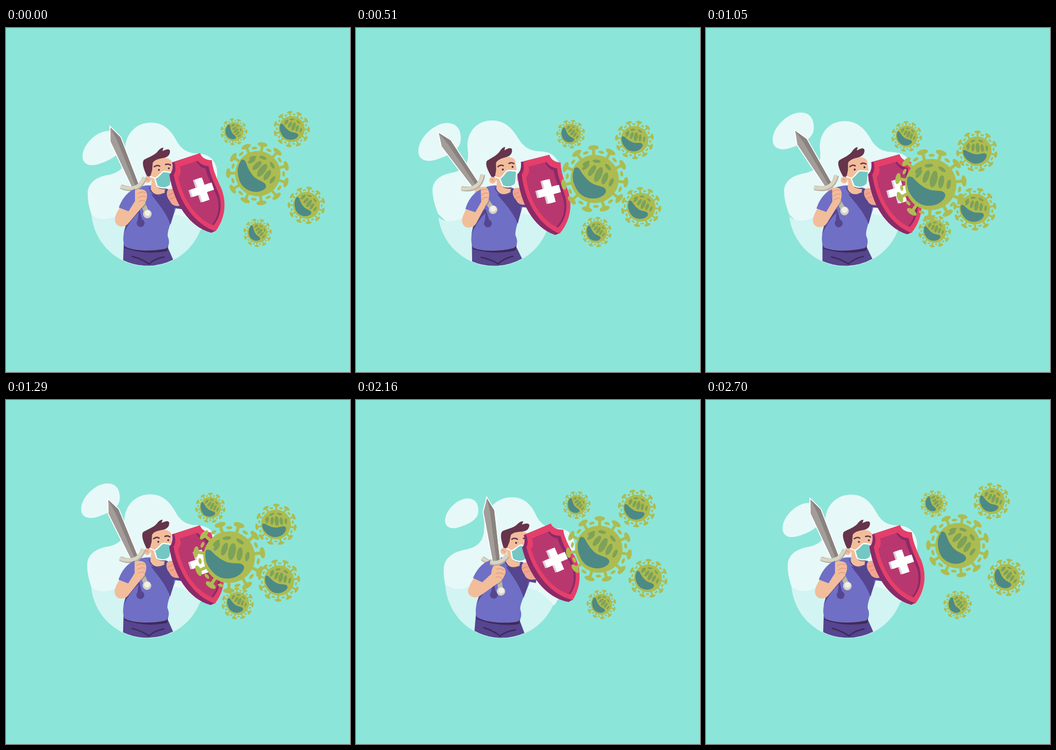
Recreate the animation shown at these times as an HTML page. Size 640x640 px, loop 2.73 s.

```html
<!DOCTYPE html>
<html lang="en">
<head>
<meta charset="utf-8">
<title>Shield against viruses</title>
<style>
html, body { margin: 0; width: 100%; height: 100%; overflow: hidden; background: #8ce5d9; }
svg { display: block; width: 100vw; height: 100vh; }
.skin { fill: #f2bd9b; }
.shirt { fill: #6f6fc6; }
.dark { fill: #56458f; }
.line { fill: none; stroke-linecap: round; stroke-linejoin: round; }
</style>
</head>
<body>
<svg viewBox="0 0 640 640">
  <defs>
    <g id="virus"></g>
    <path id="blade" d="M0-175L10-151L6.5-54H-6.5L-10-151Z"/>
    <path id="cross" d="M-7-22H7V-7H21V7H7V22H-7V7H-21V-7H-7Z"/>
  </defs>

  <path id="puff" fill="#e6f9f8" d="M-40 17C-40-8-10-36 14-36C34-36 40-22 40-6C40 16 14 26-6 33C-24 39-40 34-40 17Z"/>
  <path id="cloud" fill="#e6f9f8" d="M160 350C155 335 152 322 152 310C151 290 166 277 192 273C214 268 223 257 222 232C219 203 238 176 270 176C296 176 309 194 318 211C330 232 345 233 362 234C384 236 393 254 393 272C392 310 378 350 363 376L300 395L190 380Z"/>

  <g id="body">
    <path fill="#d2f4f3" d="M159 347C170 358 190 358 206 349C240 330 280 355 312 348C330 346 348 362 362 375A105 105 0 0 1 159 347Z"/>
    <path class="dark" d="M219 400L218 432A105 105 0 0 0 311 431L300 406Z"/>
    <path class="line" stroke="#3f2a55" stroke-width="2.5" d="M235 425Q254 430 266 439Q277 429 294 426"/>
    <path fill="#3f2a55" d="M222 399L220 409Q260 423 300 415L302 404Z"/>
    <path class="skin" d="M213 332C206 343 200 354 204 362C208 371 221 371 227 362L232 338Z"/>
    <path class="shirt" d="M236 300C250 294 262 292 270 293L296 298C308 301 316 312 318 328L314 342C308 358 299 380 301 388C306 399 302 410 295 411C270 416 238 415 222 407C215 398 219 378 224 364L232 330Z"/>
    <path class="dark" d="M270 309Q290 313 298 299C308 302 314 315 317 326L328 331L327 337L313 335C313 345 309 356 306 366C298 343 284 328 270 309Z"/>
    <path class="dark" d="M224 363L240 338L248 336L253 356A7.3 7.3 0 1 1 245 358L247 343Q230 358 219 382Z"/>
    <path class="skin" d="M271 284L297 288L295 307Q283 318 269 302Z"/>
    <path class="line" stroke="#56458f" stroke-width="2" d="M267 297Q274 317 294 308"/>
    <path fill="#4a2a4f" d="M276 290Q286 299 298 297L295 300Q282 300 276 290Z"/>
    <path fill="#f0a58f" d="M300 303C304 298 312 298 316 302L326 330C316 333 308 330 305 322C300 316 298 310 300 303Z"/>
    <path class="line" stroke="#d98278" d="M302 311L311 307M305 318L314 315"/>

    <g id="head">
      <path class="skin" d="M268 250C280 240 305 238 309 250L311 285C305 298 285 300 275 292C268 285 266 262 268 250Z"/>
      <path fill="#66344b" d="M263 277C256 263 252 250 257 245C266 240 276 237 282 230C285 226 290 222 293 223L291 229C297 226 303 224 305 228C306 236 300 241 292 242C284 243 275 246 273 251L272 264L268 278Z"/>
      <circle class="skin" cx="263.5" cy="282" r="6.2"/>
      <path class="line" stroke="#dd9782" stroke-width="1.3" d="M261 281Q264 279 265 284"/>
      <path class="line" stroke="#66344b" stroke-width="2.6" d="M276 258Q281 254 286 257M297 254Q302 252 306 255"/>
      <circle cx="284.5" cy="264" r="1.8" fill="#4a2a3f"/>
      <circle cx="303" cy="261" r="1.8" fill="#4a2a3f"/>
      <path class="line" stroke="#fff" stroke-width="2" d="M268 276L278 280"/>
      <path fill="#74c8c4" stroke="#fff" stroke-width="2.4" stroke-linejoin="round" d="M277 280C286 276 289 267 294 267C300 267 305 269 310 269L306 292C300 299 288 299 281 294Z"/>
    </g>

    <g id="arm">
      <g transform="translate(263 346) rotate(-23.1)">
        <use href="#blade" fill="#fff" stroke="#fff" stroke-width="3.5"/>
        <use href="#blade" fill="#a39d99"/>
        <path fill="#8a827f" d="M0-175L10-151L6.5-54H0L2-148Z"/>
        <path fill="#bdb8ab" d="M-4.5-52H4.5V-4H-4.5Z"/>
        <path class="line" stroke="#928c82" stroke-width="1.6" d="M-4-14L4-18M-4-20L4-24"/>
        <path fill="none" stroke="#b5b0a0" stroke-width="9" d="M-25-66Q0-41 22-64"/>
        <path fill="none" stroke="#d8d5c4" stroke-width="6" d="M-26-67Q0-43 22-65"/>
        <circle r="8" fill="#d5d1c4"/>
        <circle cx="1" cy="-1.5" r="5.5" fill="#f1f0e8"/>
      </g>
      <path class="skin" d="M212 340C205 348 201 356 204 362C208 372 222 371 228 363L255 331L238 318L226 337Z"/>
      <path class="skin" d="M237 305C243 298 258 299 261 305C265 312 260 328 254 331C244 335 234 322 237 305Z"/>
      <path class="line" stroke="#dd9782" stroke-width="1.2" d="M245 308Q253 303 260 307M246 316Q254 311 260 314M247 323Q253 319 258 322"/>
    </g>
    <path class="shirt" d="M240 299C223 306 214 322 210 334L228 341L240 322Z"/>
  </g>

  <g id="shield">
    <path fill="#8a2a68" d="M309 250L361 233L391 377L382 381C340 370 312 325 304 273Q312 266 309 250Z"/>
    <path fill="#e43f6a" d="M313 249L361 233C364 241 372 246 383 246C384 262 392 280 400 297C412 325 407 356 390 378C352 366 322 325 312 273Q318 264 313 249Z"/>
    <path fill="#8a2a68" d="M324 258L357 247C361 253 369 257 377 257C380 275 391 295 397 312C403 335 397 355 386 367C356 355 330 322 321 278Q328 269 324 258Z"/>
    <path fill="#b9376f" d="M324 258L354 248C358 256 366 261 371 261C375 280 388 300 393 315C399 336 393 355 383 366C356 355 330 322 321 278Q328 269 324 258Z"/>
    <g transform="translate(365 301) rotate(-19)">
      <use href="#cross" x="-3.5" y="-.5" fill="#d9cedb"/>
      <use href="#cross" fill="#fff"/>
    </g>
  </g>

  <g id="swarm"></g>
</svg>
<script>
const LOOP = 2730, CYCLE = 2700;
const NS = 'http://www.w3.org/2000/svg';
const $ = id => document.getElementById(id);

function add(parent, tag, attrs) {
  const el = document.createElementNS(NS, tag);
  for (const k in attrs) el.setAttribute(k, attrs[k]);
  return parent.appendChild(el);
}

// One virus with a body radius of 1
function buildVirus(g) {
  const green = '#adbc50', spot = '#7da259', spikes = 11;
  for (let i = 0; i < spikes; i++) {
    const spike = add(g, 'g', { transform: `rotate(${14 + i * 360 / spikes})` });
    add(spike, 'path', { d: 'M0-.9V-1.3', stroke: green, 'stroke-width': .12 });
    add(spike, 'ellipse', { cy: -1.3, rx: .22, ry: .1, fill: green });
    add(spike, 'ellipse', { cy: -1.14, rx: .12, ry: .06, fill: green, transform: 'rotate(16)' });
  }
  add(g, 'circle', { r: 1, fill: green });

  // A fan of ovals, largest in the middle, below a ring of three
  for (let i = 0; i < 5; i++) {
    const mid = 1 - Math.abs(i - 2) / 2;
    add(g, 'ellipse', {
      rx: .08 + .06 * mid, ry: .19 + .14 * mid, fill: spot,
      transform: `translate(${-.5 + .3 * i} ${-.38 + .08 * i}) rotate(${32 - 18 * i + 3 * i * i})`
    });
  }
  for (const a of [-45, -10, 32])
    add(g, 'ellipse', { cy: -.74, rx: .17, ry: .07, fill: spot, transform: `rotate(${a})` });

  add(g, 'path', {
    fill: '#4d8a85',
    d: 'M-.93-.15C-.92-.27-.8-.27-.7-.2C-.5 0-.2.2.05.22S.47.18.57.3S.5.65.3.75S-.3.92-.6.62S-.94.1-.93-.15Z'
  });
}
buildVirus($('virus'));

// Each flies from `from` to `to`, turning there at time `peak`
const viruses = [
  { from: [424, 193], to: [372, 202], size: 25, tilt: 42, peak: 1080 },
  { from: [531.5, 188], to: [500, 235], size: 34, tilt: 12, peak: 1200 },
  { from: [559, 330], to: [498.5, 337], size: 35, tilt: 28, peak: 1080 },
  { from: [468, 381], to: [424, 378], size: 26.5, tilt: 38, peak: 1080 },
  { from: [468.5, 271], to: [411, 294], size: 59, tilt: 28, peak: 1200 }
];
for (const v of viruses) v.el = add($('swarm'), 'use', { href: '#virus' });

const mix = (a, b, p) => a + (b - a) * p;

// Steady approach, easing retreat
const approach = (t, peak) =>
  t < peak ? t / peak : ((CYCLE - t) / (CYCLE - peak)) ** 1.22;

// Lean of the fighter: left, then right, then back to rest
function sway(t) {
  const left = 745, right = 1975, low = -1.43, high = 1.57;
  if (t < left) return low * t / left;
  if (t < right) return mix(low, high, (t - left) / (right - left));
  return high * (CYCLE - t) / (CYCLE - right);
}

const move = (el, value) => el.setAttribute('transform', value);
const parts = ['puff', 'cloud', 'body', 'head', 'arm', 'shield'].map($);

function draw(t) {
  const [puff, cloud, body, head, arm, shield] = parts;
  const m = sway(t);
  const puffY = 205.5 + 18 * Math.cos(2 * Math.PI * t / CYCLE);
  const skew = .058 * m;
  move(puff, `translate(${178 + m * (m < 0 ? 23 : 16)} ${puffY}) scale(${.89 - .1 * m})`);
  move(cloud, `matrix(1 0 ${-skew} 1 ${476 * skew} ${4.2 * m})`);
  move(body, `rotate(${2.65 * m} 265 476)`);
  move(head, `rotate(${3.2 * m} 280 295)`);
  move(arm, `rotate(${9.8 * m} 213 352)`);
  move(shield, `translate(${6 * m} ${-3 * m}) rotate(${-4 * m} 364 301)`);
  for (const { el, from, to, size, tilt, peak } of viruses) {
    const p = approach(t, peak);
    const [x, y] = from.map((f, i) => mix(f, to[i], p));
    const scale = size * mix(1, 1.15, p) / 1.4;
    move(el, `translate(${x} ${y}) rotate(${tilt - 27 * p}) scale(${scale})`);
  }
}

function tick() {
  draw(Math.min(performance.now() % LOOP, CYCLE));
  requestAnimationFrame(tick);
}
tick();
</script>
</body>
</html>
```
